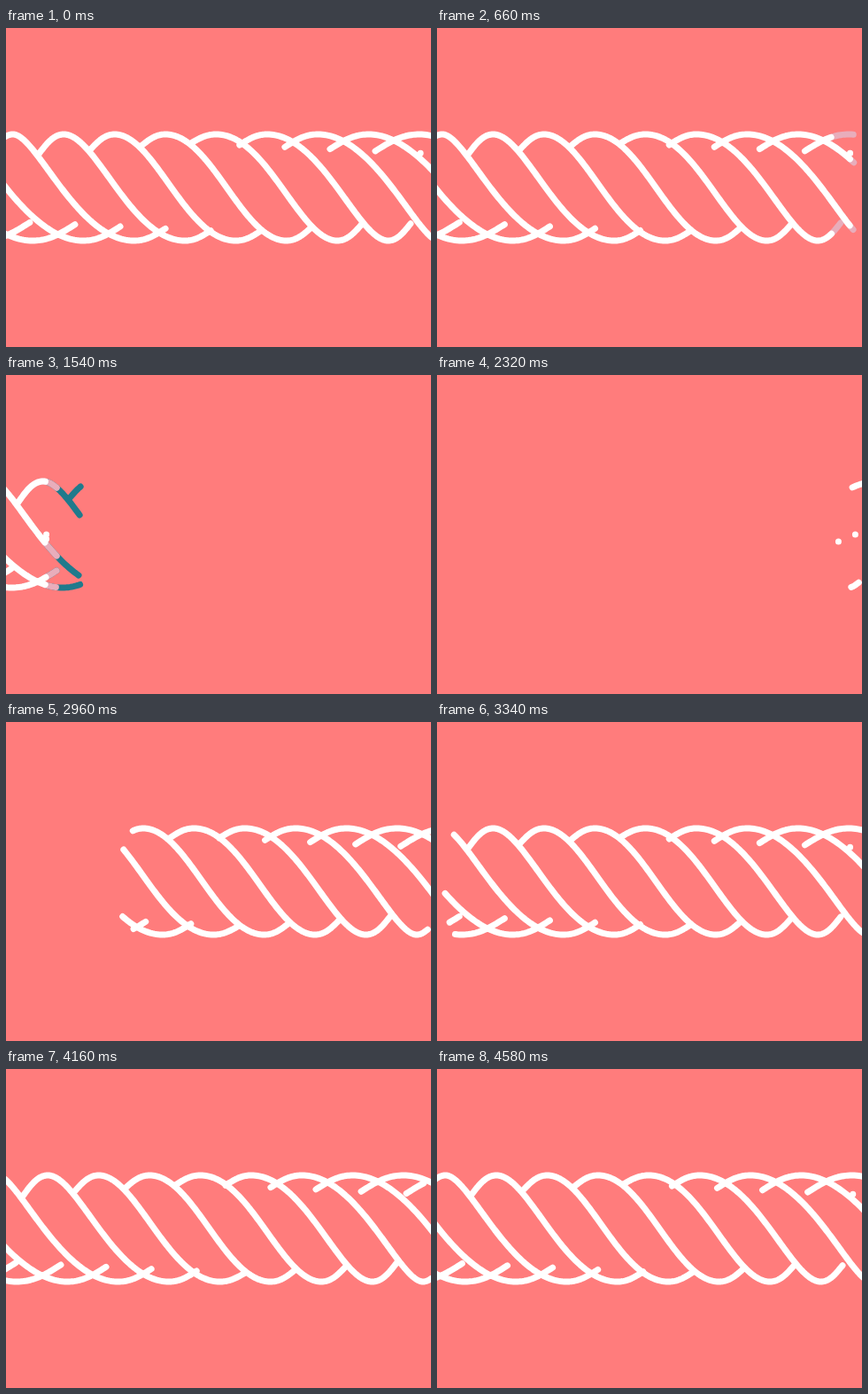
Write an HTML page that moves like this. It is 480x360 px and loops after 4600 ms.

```html
<!DOCTYPE html>
<html lang="en">
<head>
<meta charset="utf-8">
<title>Rope</title>
<style>
html, body { margin: 0; width: 100%; height: 100%; overflow: hidden; background: #ff7c7c; }
svg { display: block; width: 100vw; height: 100vh; }
path { fill: none; stroke-width: 7; stroke-linecap: round; stroke-linejoin: round; }
</style>
</head>
<body>
<svg viewBox="0 0 480 360">
  <path id="teal" stroke="#1f7a8c"/>
  <path id="pale" stroke="#e8adbb"/>
  <path id="white" stroke="#fff"/>
</svg>
<script>
const LOOP = 4600, STEP = 640, WIDTH = 480;
const LEAVE = 640, GONE = 2000, ENTER = 2310, OPEN = 2340;
const GAP = 57.4, SPAN = 136.6, TOP = 120, BOTTOM = 240, MID = 180;
const [teal, pale, white] = ['teal', 'pale', 'white'].map(id => document.getElementById(id));

const clamp = v => Math.max(0, Math.min(1, v));

// The shape of a strand follows from where its crest stands
const handle = x => Math.max(4, 25 + 0.19 * x - 0.00022 * x * x);
const reach = x => Math.max(29, 31 + 0.11 * (x - 294));
const drop = x => Math.max(28 - 0.075 * x, 0.24 + 0.04 * x);

// Edge that slows down until it stops at time end
const edgeAt = (t, end, t0, x0, stop, power) =>
  stop + (x0 - stop) * Math.pow(Math.max(0, (end - t) / (end - t0)), power);

function bezier(a, b, c, d, n) {
  return Array.from({ length: n + 1 }, (_, i) => {
    const t = i / n, s = 1 - t;
    return [0, 1].map(j => s * s * s * a[j] + 3 * s * s * t * b[j] + 3 * s * t * t * c[j] + t * t * t * d[j]);
  });
}

// Rising hook that leads into a crest
function hook(crest, dx, dy) {
  const x = crest - dx;
  return bezier([x, TOP + dy], [x + 0.33 * dx, TOP + 0.45 * dy],
    [crest - 0.4 * dx, TOP], [crest, TOP], 24);
}

// The lower half is the upper half turned by 180 degrees
function strand(crest) {
  const trough = crest + SPAN, twin = WIDTH - trough;
  const full = reach(twin);
  const len = Math.max(0.5, Math.min(full, 26 - 0.4 * (trough - 430)));
  const tail = hook(twin, len, drop(twin) * Math.pow(len / full, 1.8))
    .map(([x, y]) => [WIDTH - x, 2 * MID - y]).reverse();
  const body = bezier([crest, TOP], [crest + handle(crest), TOP],
    [trough - handle(twin), BOTTOM], [trough, BOTTOM], 80);
  const pts = [...hook(crest, reach(crest), drop(crest)), ...body, ...tail];
  // The newest strand grows out of a dot
  const x = pts[0][0];
  const end = crest > 504 ? x + 25 * clamp((520 - crest) / 16) : Infinity;
  return pts.filter((p, i) => !i || p[0] <= end);
}

function ropes(phase) {
  const list = [];
  for (let k = -5; k < 11; k++) {
    const crest = 8 + GAP * (k + phase);
    if (crest < 528) list.push(strand(crest));
  }
  return list;
}

// Keep the part between two edges; near the rim it is pulled in a little
function trim(pts, lo, hi, inset) {
  const pull = y => inset * clamp((Math.abs(y - MID) - 44) / 6);
  let a = 0, b = pts.length;
  pts.forEach(([x, y], i) => { if (x < lo + pull(y)) a = i + 1; });
  for (let i = a; i < b; i++) if (pts[i][0] > hi - pull(pts[i][1])) b = i;
  return pts.slice(a, b);
}

const line = pts => pts.length
  ? 'M' + [...pts, pts[pts.length - 1]].map(p => p.map(v => v.toFixed(2)).join(' ')).join('L')
  : '';
const cut = (list, lo, hi, inset) => list.map(p => line(trim(p, lo, hi, inset))).join('');
const dots = (...pts) => pts.map(p => line([p])).join('');

function leave(t) {
  const list = ropes(1 - (t / STEP) % 1);
  if (t < LEAVE) return [cut(list, -999, 999, 0), '', ''];
  const w = edgeAt(t, 1960, 1040, 236.5, -8, 1.93);
  const p = edgeAt(t, 1975, 1040, 252.5, -8, 1.79);
  const c = edgeAt(t, 1990, 1040, 269.5, -5, 1.5);
  const ends = t > 900 ? dots([w, 180], [w, 185]) : '';
  return [cut(list, -999, w, 22 * clamp((1000 - t) / 340)) + ends,
    cut(list, w - 26, p, 0), cut(list, w, c, 0)];
}

function enter(t) {
  const list = ropes(((LOOP - t) / STEP) % 1);
  const edge = edgeAt(t, 3520, 2320, 457, -20, 1.5);
  if (t > OPEN) return [cut(list, edge < -5 ? -999 : edge, 999, 11), '', ''];
  // Strands that cross the whole rope are still closed to dots
  const short = list.filter(p => p[0][0] > 440 || p[0][0] < 320);
  return [cut(short, edge, 999, 11) + dots([edge - 3, 188], [edge + 16, 180]), '', ''];
}

function draw(t) {
  const d = t < GONE ? leave(t) : t < ENTER ? ['', '', ''] : enter(t);
  [white, pale, teal].forEach((el, i) => el.setAttribute('d', d[i]));
}

const start = performance.now();
function frame() {
  draw((performance.now() - start) % LOOP);
  requestAnimationFrame(frame);
}
frame();
</script>
</body>
</html>
```
